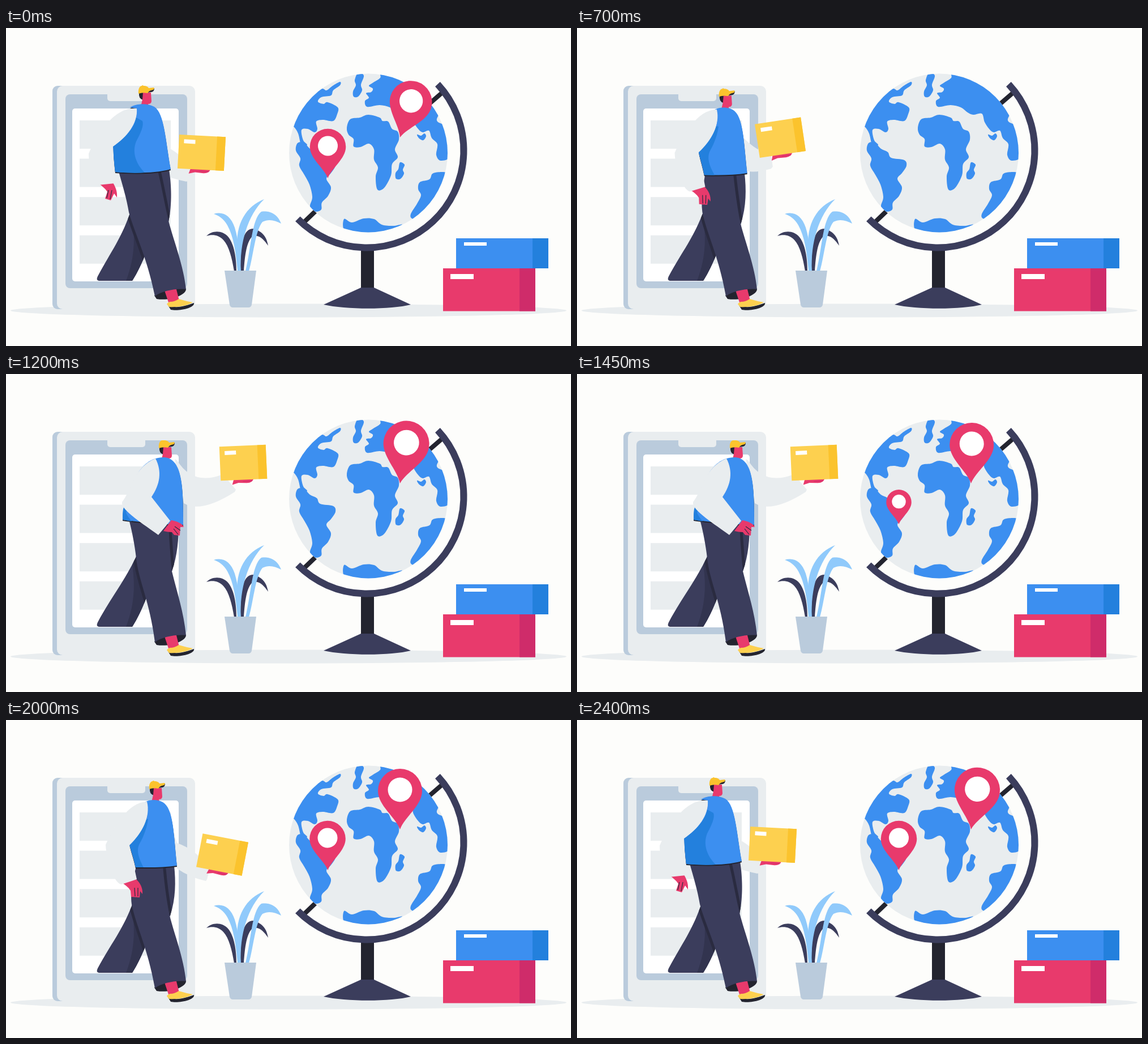
These frames come from a looping animation (998x561 px, 2450 ms). An HTML page with a canvas:

```html
<!DOCTYPE html>
<html>
<head>
<meta charset="utf-8">
<title>Parcel delivery</title>
<style>
html, body { margin: 0; width: 100%; height: 100%; overflow: hidden; background: #fdfdfb; }
canvas { display: block; }
</style>
</head>
<body>
<canvas id="stage" width="998" height="561"></canvas>
<script>
const ctx = document.getElementById('stage').getContext('2d');
const LOOP = 2450, STEP = 50;
const C = {
  bg: '#fdfdfb', light: '#e9edef', steel: '#bacbdc', white: '#ffffff',
  blue: '#3c8ff0', deepBlue: '#2380dd', sky: '#90cafb',
  navy: '#3b3d5c', night: '#2a2b40', black: '#23242f',
  pink: '#e83a6c', berry: '#cf2c6a', yellow: '#fdd04f', gold: '#fbc32d'
};

function fill(path, color) {
  ctx.fillStyle = color;
  ctx.fill(typeof path === 'string' ? new Path2D(path) : path);
}
function line(path, color, width) {
  ctx.strokeStyle = color;
  ctx.lineWidth = width;
  ctx.stroke(new Path2D(path));
}
function rect(x, y, w, h, color, radius = 0) {
  ctx.fillStyle = color;
  ctx.beginPath();
  ctx.roundRect(x, y, w, h, radius);
  ctx.fill();
}
function disc(x, y, rx, ry, color) {
  ctx.fillStyle = color;
  ctx.beginPath();
  ctx.ellipse(x, y, rx, ry, 0, 0, Math.PI * 2);
  ctx.fill();
}
function scoped(draw) {
  ctx.save();
  draw();
  ctx.restore();
}

const clamp = v => Math.min(1, Math.max(0, v));
const mix = (a, b, u) => a + (b - a) * u;
const smooth = (a, b, t) => { const u = clamp((t - a) / (b - a)); return u * u * (3 - 2 * u); };
const ease = { lin: u => u, in: u => u * u, out: u => u * (2 - u), both: u => u * u * (3 - 2 * u) };
const NUMBER = /-?[\d.]+/g;

// Blends every number of two equally structured strings.
function blend(a, b, u) {
  const to = b.match(NUMBER);
  let i = 0;
  return a.replace(NUMBER, v => mix(+v, +to[i++], u).toFixed(2));
}
// Keys are [position, string, easing towards this key].
function track(keys, x) {
  if (x <= keys[0][0]) return keys[0][1];
  for (let i = 1; i < keys.length; i++) {
    const [x0, a] = keys[i - 1], [x1, b, how = 'lin'] = keys[i];
    if (x <= x1) return blend(a, b, ease[how]((x - x0) / (x1 - x0)));
  }
  return keys[keys.length - 1][1];
}
const values = (keys, x) => track(keys, x).match(NUMBER).map(Number);

// Closed smooth curve through a few points.
function land(text) {
  const n = text.match(NUMBER).map(Number), pts = [];
  for (let i = 0; i < n.length; i += 2) pts.push([n[i], n[i + 1]]);
  const at = i => pts[(i + pts.length) % pts.length];
  const path = new Path2D();
  path.moveTo(...pts[0]);
  pts.forEach((p, i) => {
    const a = at(i - 1), q = at(i + 1), b = at(i + 2);
    path.bezierCurveTo(p[0] + (q[0] - a[0]) / 6, p[1] + (q[1] - a[1]) / 6,
      q[0] - (b[0] - p[0]) / 6, q[1] - (b[1] - p[1]) / 6, q[0], q[1]);
  });
  return path;
}

const lands = [
  land('500,172 520,130 555,108 566,110 577,102 590,95 590,101 578,110 574,119 557,122 551,130 561,134 568,131 586,140 585,152 578,164 560,162 548,165 550,178 545,184 533,178 522,180 525,198 532,206 522,208 516,186 508,174'),
  land('622,79 632,84 627,100 629,110 622,121 614,121 613,112 618,101 616,92'),
  land('664,78 661,88 649,96 641,102 648,107 645,113 636,115 641,123 634,129 638,139 660,136 678,140 690,149 700,153 715,151 720,166 728,178 736,184 747,181 752,194 762,205 760,224 768,234 785,226 784,190 774,172 761,163 765,140 735,95 700,80'),
  land('726,188 733,190 739,186 742,191 737,198 730,195'),
  land('602,176 608,161 625,158 640,153 660,158 665,164 675,165 682,178 692,183 694,197 687,214 692,228 682,240 680,260 668,282 656,285 653,262 657,246 650,232 650,214 641,204 626,210 614,209 614,196 605,188'),
  land('696,237 704,241 701,250 703,257 697,266 689,266 688,256 693,249'),
  land('515,203 526,202 537,213 549,219 555,229 578,233 582,243 574,256 566,266 574,281 569,296 558,308 557,320 548,324 539,320 537,313 541,298 536,276 527,259 518,243 520,230 512,216'),
  land('780,256 755,256 748,267 731,272 728,284 733,295 726,310 715,328 717,336 730,336 760,310 780,275'),
  land('597,337 611,343 632,336 650,337 664,347 684,349 700,347 680,362 640,368 600,360')
];

function drawPhone() {
  rect(82, 102, 60, 394, C.steel, 9);
  rect(90, 102, 244, 394, C.light, 10);
  rect(105, 117, 215, 342, C.steel, 8);
  rect(117, 142, 188, 305, C.white, 5);
  rect(179, 110, 67, 19, C.light, 5);
  for (let i = 0; i < 4; i++) rect(130, 163 + i * 67.6, 161, 50, C.light);
}

function drawPlant() {
  fill('M354,367 C364,357 382,356 393,369 C403,382 407,405 407,429 L403,429 C399,405 394,385 384,374 C375,364 363,364 354,367Z', C.navy);
  fill('M463,384 C460,365 450,358 437,354 C420,354 414,375 414,429 L420,429 C422,400 425,376 436,367 C448,364 456,374 463,384Z', C.navy);
  fill('M367,328 C383,323 397,331 404,352 C411,375 413,400 413,429 L409,429 C406,395 402,368 391,348 C384,336 376,331 367,328Z', C.sky);
  fill('M456,302 C425,314 404,345 409,392 L411,429 L415,429 C412,380 427,330 456,302Z', C.sky);
  fill('M486,345 C479,326 463,322 451,324 C434,337 433,388 423,429 L429,429 C437,402 440,358 453,342 C465,336 476,340 486,345Z', C.sky);
  fill('M386,428 H442 L434,488 Q433,493 428,493 H401 Q396,493 395,488Z', C.steel);
}

function drawGlobe() {
  rect(627, 388, 23, 74, C.black);
  fill('M627,458 H650 L715,488 C680,497 600,497 561,488Z', C.navy);
  line('M745,136 L774,111 M551,319 L527,342', C.black, 8);
  ctx.strokeStyle = C.navy;
  ctx.lineWidth = 12;
  ctx.beginPath();
  ctx.arc(637, 216, 171.5, -43 * Math.PI / 180, 135.2 * Math.PI / 180);
  ctx.stroke();
  scoped(() => {
    disc(640, 220.5, 140, 140, C.light);
    ctx.clip();
    lands.forEach(shape => fill(shape, C.blue));
  });
}

function drawStack() {
  rect(795, 371, 163, 53, C.blue);
  rect(930, 371, 28, 53, C.deepBlue);
  rect(809, 378, 40, 6, C.white);
  rect(772, 424, 163, 75.5, C.pink);
  rect(907, 424, 28, 75.5, C.berry);
  rect(785, 434, 41, 9, C.white);
}

// Scale in percent, then tilt in degrees.
const pinIn = [[0, '0 -30'], [100, '70 0'], [200, '108 12'], [250, '104 9'], [350, '98 -7'],
  [450, '100 5'], [550, '100 -3'], [750, '100 2'], [950, '100 0']];
const pinOut = [[0, '100 0'], [100, '105 5'], [150, '103 9'], [200, '96 17'], [250, '80 23'],
  [300, '48 27'], [350, '11 30'], [380, '0 30']];

function drawPin(x, y, size, t, appear, leave) {
  const age = (t - appear + LOOP) % LOOP, gone = (t - leave + LOOP) % LOOP;
  const [scale, tilt] = gone < age ? values(pinOut, gone) : values(pinIn, age);
  if (scale <= 0) return;
  scoped(() => {
    ctx.translate(x, y);
    ctx.rotate(tilt * Math.PI / 180);
    ctx.scale(size * scale / 100, size * scale / 100);
    fill('M0,0 C-8,-22 -39,-42 -39,-68 A39,39 0 0 1 39,-68 C39,-42 8,-22 0,0Z', C.pink);
    disc(0, -70, 21.5, 21.5, C.white);
  });
}

// Poses below run over the body's lean: 0 is back, 1 is fully forward.
const MID = 0.5, NEAR = 0.865;
const lean = (...poses) => [0, MID, NEAR, 1].map((x, i) => [x, poses[i]]);

const headPose = lean('0 0', '19 6', '31 10', '36 15');
const vestPose = lean(
  'M219,140 C230,133 250,132 262,139 C280,150 282,200 291,249 C262,257 225,256 193,254 C191,238 190,224 189,209 C214,192 232,168 231,142Z',
  'M236,154 C244,140 264,138 277,145 C296,156 296,200 302,257 C275,261 250,260 229,260 C226,246 222,234 218,220 C243,197 254,170 249,147Z',
  'M236,160 C246,146 264,141 282,145 C306,152 306,200 308,263 C280,265 240,264 207,257 C203,255 200,253 198,251 C206,220 215,190 236,160Z',
  'M230,181 C240,160 258,146 280,147 C312,150 313,200 313,266 C285,266 240,262 206,257 C206,250 207,242 208,234 C215,215 222,198 230,181Z');
const shadePose = lean(
  'M230,158 C226,178 210,194 189,209 C190,224 191,238 193,254 C215,256 235,256 245,255 C230,240 222,220 230,200 C238,185 244,172 241,164Z',
  'M248,175 C243,192 232,208 218,220 C222,234 226,246 229,260 C233,260 238,260 243,260 C238,250 228,232 236,218 C244,205 250,185 251,175Z',
  'M210,235 C207,238 204,242 202,245 C200,248 199,250 198,251 C202,255 205,256 208,257 C214,258 220,250 225,240 C220,238 215,236 210,235Z',
  'M215,236 C212,236 209,236 207,238 C206,244 206,250 206,257 C211,258 216,259 222,260 C218,255 214,250 212,245 C213,240 214,238 215,236Z');
const sleevePose = lean(
  'M231,142 C233,168 214,192 189,209 L192,274 L163,277 C155,262 146,245 146,222 C160,190 190,138 231,142Z',
  'M249,144 C256,170 240,200 218,221 L231,281 L204,290 C190,288 177,245 176,220 C190,190 215,145 249,144Z',
  'M261,144 C271,172 262,200 239,222 L264,280 L232,294 C215,270 194,240 193,220 C215,198 220,150 261,144Z',
  'M264,149 C276,172 272,195 257,217 L290,259 L269,284 C245,266 202,240 205,226 C222,205 225,165 264,149Z');
const handPose = lean(
  'M166,276 L189,273 C193,280 197,288 196,299 L191,292 L185,304 L175,301 L179,289 C175,283 170,279 166,276Z',
  'M206,288 L230,281 C237,287 242,297 241,307 L237,302 L236,313 L221,312 L220,301 C216,295 211,291 206,288Z',
  'M243,293 L264,280 C273,286 281,292 280,301 L276,297 L274,308 L262,308 L262,297 C256,297 249,296 243,293Z',
  'M278,277 L292,258 C302,260 311,263 314,270 L308,270 L307,285 L297,284 L293,279 C288,279 283,278 278,277Z');
const fingerPose = lean(
  'M181,286 L178,300 M187,286 L184,302', 'M227,296 L228,311 M233,296 L233,311',
  'M267,292 L267,307 M272,291 L273,305', 'M298,269 L308,276 M296,273 L304,283');
const farLegPose = lean(
  'M250,252 L288,250 C292,275 294,310 287,342 L247,397 C240,415 232,432 223,446 L166,446 Q158,446 162,438 C185,395 205,370 222,318Z',
  'M255,258 L297,257 C300,285 300,315 290,345 L247,397 C240,415 232,432 223,446 L166,446 Q158,446 162,438 C185,395 207,370 226,318Z',
  'M260,262 L302,262 C303,290 302,320 292,348 L247,397 C240,415 232,432 223,446 L166,446 Q158,446 162,438 C185,395 210,365 231,318Z',
  'M260,262 L305,264 C305,290 303,320 293,348 L247,397 C240,415 232,432 223,446 L166,446 Q158,446 162,438 C185,395 210,365 232,318Z');
const nearLegPose = lean(
  'M199,253 C205,275 213,300 217,325 C228,365 248,400 263,473 C275,464 300,459 318,461 C314,420 296,375 287,340 C280,310 275,280 268,251Z',
  'M230,258 C226,275 219,300 222,325 C230,365 250,400 263,473 C275,464 300,459 318,461 C314,420 298,380 289,345 C282,310 279,280 277,257Z',
  'M217,261 C222,280 226,300 229,325 C234,365 252,400 263,473 C275,464 300,459 318,461 C314,420 300,385 292,348 C288,315 286,290 286,261Z',
  'M218,260 C223,280 227,300 230,325 C234,365 254,400 263,473 C275,464 300,459 318,461 C314,420 302,385 293,348 C290,315 288,290 287,261Z');

// Carrying arm over time.
const armBack = 'M262,150 L285,262 Q303,268 319,271 L326,249 Q312,225 290,213Z';
const armLow = 'M280,150 L302,262 Q325,278 353,284 L360,262 Q335,228 302,217Z';
const armHigh = 'M292,150 L309,229 Q318,240 385,208 L390,201 L372,177 Q345,184 330,190 Q318,160 298,150Z'
  .replace(' Q345,184 330,190 Q318,160 298,150', ' Q326,204 300,158');
const armFore = 'M298,150 L314,228 Q345,246 404,208 L406,204 L383,177 Q330,198 302,152Z';
const pad = path => path.replace(/L(326,249)/, 'L321,269 L$1').replace(/L(360,262)/, 'L355,281 L$1');
const armTime = [[400, pad(armBack)], [900, armHigh, 'in'], [1200, armFore, 'out'], [1650, armFore],
  [2000, pad(armLow), 'in'], [2350, pad(armBack), 'out']];
// Parcel centre and tilt.
const parcelTime = [[400, '345.5 220 3'], [900, '383 146 -29', 'in'], [1200, '419 156.5 -2.5', 'out'],
  [1550, '419 156.5 -2.5'], [1700, '416.5 157.5 -7', 'in'], [2000, '382 237.5 11', 'lin'], [2350, '345.5 220 3', 'out']];

function drawParcel(t) {
  const [x, y, tilt] = values(parcelTime, t);
  scoped(() => {
    ctx.translate(x, y);
    ctx.rotate(tilt * Math.PI / 180);
    fill('M-21,38 L-18,29 H17 Q15,36 5,36 L-10,35Z', C.pink);
    line('M-2,33 L14,33', C.berry, 1);
    rect(-41, -30, 82, 60, C.yellow);
    rect(26, -30, 15, 60, C.gold);
    rect(-32, -22, 20, 7, C.white);
  });
}

function drawHead(p) {
  const [dx, dy] = values(headPose, p);
  scoped(() => {
    if (p > 0.93) {
      ctx.beginPath();
      ctx.rect(0, 117, 998, 444);
      ctx.clip();
    }
    ctx.translate(dx, dy);
    fill('M235,114 H245 L242,127 Q234,125 235,114Z', C.black);
    fill('M242,114 H256 L257,129 Q257,134 251,134 L252,139 H238 L241,126Z', C.pink);
    fill('M249,114 C252,108 258,107 262,106 Q262,112 257,113Z', C.black);
    fill('M234,116 C233,106 237,102 240,102 Q241,100 243,102 C248,102 251,104 252,106 L261,105 Q263,107 260,109 C254,110 252,112 250,115 Q241,113 234,116Z', C.gold);
  });
}

function drawLegs(p) {
  const far = track(farLegPose, p), near = track(nearLegPose, p);
  fill(far, C.navy);
  scoped(() => {
    ctx.clip(new Path2D(far));
    fill('M220,318 C228,360 230,400 212,446 H226 L260,397 L235,340Z', '#32344f');
    line(near, C.night, 10);
  });
  fill('M262,472 C275,460 306,456 318,460 C319,471 290,482 266,478Z', C.black);
  fill('M279,460 L300,457 L306,481 L288,487Z', C.pink);
  fill('M286,489 C300,496 318,490 332,485 C334,494 305,500 291,497Z', C.black);
  fill('M284,487 Q287,483 290,483 Q298,483 305,478 Q318,482 330,484 C320,490 303,493 288,492Z', C.yellow);
  fill(near, C.navy);
}

function drawCourier(t) {
  const p = smooth(400, 1050, t) - smooth(1650, 2350, t);
  const vest = track(vestPose, p);
  fill(track(armTime, t), C.light);
  drawParcel(t);
  drawLegs(p);
  drawHead(p);
  scoped(() => {
    ctx.translate(0, 2);
    fill(vest, C.black);
  });
  fill(vest, C.blue);
  fill(track(shadePose, p), C.deepBlue);
  fill(track(handPose, p), C.pink);
  line(track(fingerPose, p), C.night, 1.2);
  fill(track(sleevePose, p), C.light);
}

function draw(t) {
  ctx.fillStyle = C.bg;
  ctx.fillRect(0, 0, 998, 561);
  disc(499, 498.5, 491, 12, C.light);
  drawPhone();
  drawPlant();
  drawGlobe();
  drawStack();
  drawCourier(t);
  drawPin(568.5, 265, 0.815, t, 1350, 0);
  drawPin(696, 193, 1, t, 950, 2250);
}

let start;
function frame(now) {
  start ??= now;
  draw(Math.floor((now - start) % LOOP / STEP) * STEP);
  requestAnimationFrame(frame);
}
requestAnimationFrame(frame);
</script>
</body>
</html>
```
